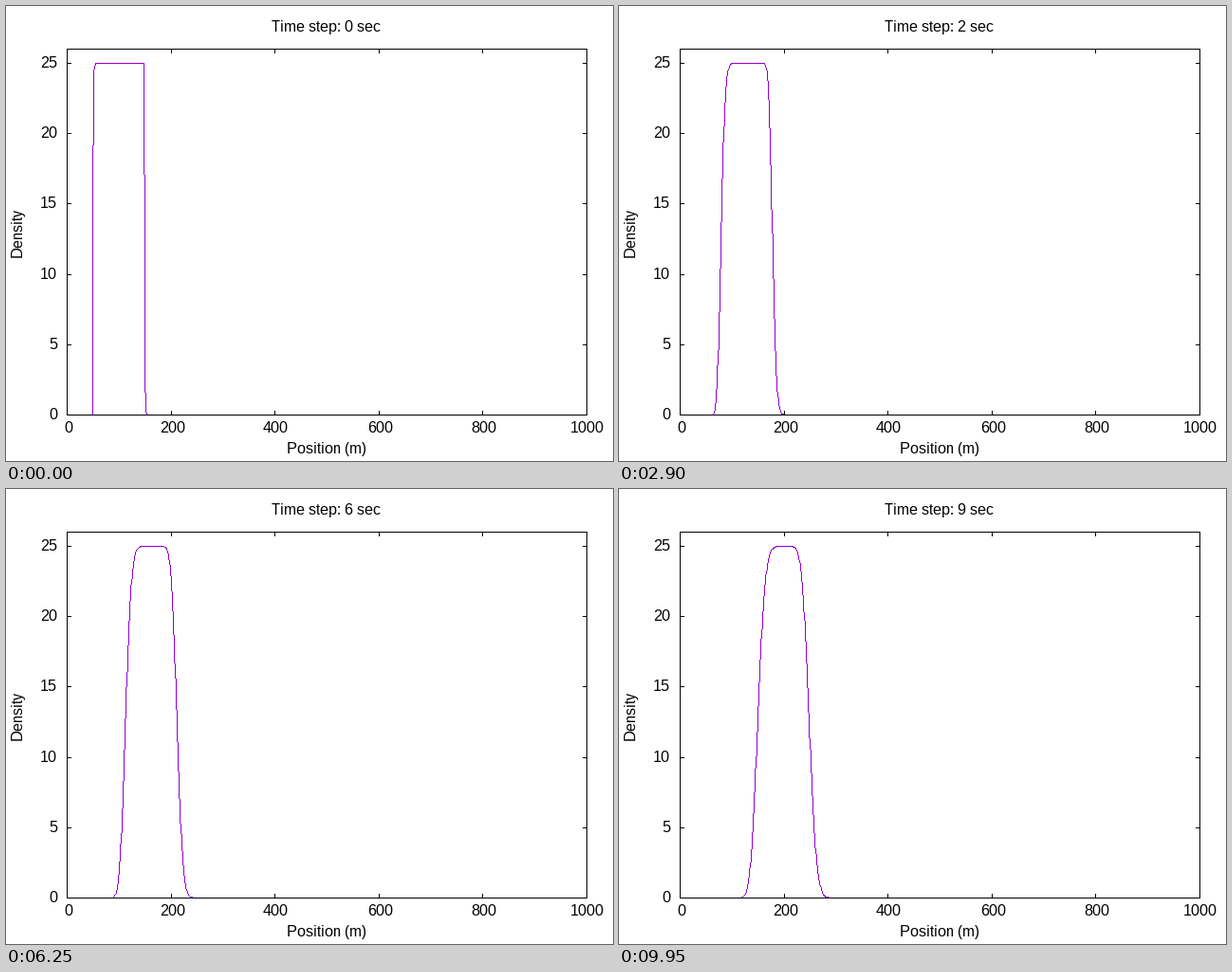
These frames come from a looping animation (640 by 480 pixels, 10 s). A matplotlib script:

```python
import numpy as np
import matplotlib.pyplot as plt
from matplotlib.animation import FuncAnimation

W, H = 640, 480
LEFT, RIGHT, TOP, BOTTOM = 64, 612, 45, 431
X_MAX, Y_MAX = 1000, 26
FRAMES, INTERVAL = 200, 50
DX, DT, SPEED, THETA = 1.0, 0.05, 10.0, 0.75
DIGIT = 9
PURPLE = (148, 0, 211, 255)

# Whole-pixel glyph advances
plt.rcParams.update({
    "font.family": "Liberation Sans",
    "font.size": 16,
    "text.hinting": "native",
    "text.hinting_factor": 1,
})

fig = plt.figure(figsize=(W / 72, H / 72), dpi=72, facecolor="white")
ax = fig.add_axes([0, 0, 1, 1])
ax.axis("off")


def nearest(v):
    return np.floor(np.asarray(v) + 0.5).astype(int)


def px(x):
    return LEFT + nearest(np.asarray(x) * (RIGHT - LEFT) / X_MAX)


def py(y):
    return BOTTOM - nearest(np.asarray(y) * (BOTTOM - TOP) / Y_MAX)


def advect():
    """Semi-implicit upwind transport of a square pulse, one profile per frame."""
    x = np.arange(0, X_MAX + DX, DX)
    u = np.where((x >= 50) & (x < 149), 25.0, 0.0)
    courant = SPEED * DT / DX
    new, old = THETA * courant, (1 - THETA) * courant
    profiles = []
    for _ in range(FRAMES):
        u[1:] -= old * np.diff(u)
        for k in range(1, len(u)):
            u[k] = (u[k] + new * u[k - 1]) / (1 + new)
        profiles.append(u.copy())
    return x, profiles


def trace(xs, ys):
    """One-pixel polyline without smoothing, on a clear canvas."""
    canvas = np.zeros((H, W, 4), np.uint8)
    for x0, y0, x1, y1 in zip(xs[:-1], ys[:-1], xs[1:], ys[1:]):
        if y0 == y1 == BOTTOM:
            continue  # hidden by the border
        n = max(abs(x1 - x0), abs(y1 - y0)) + 1
        cols = nearest(np.linspace(x0, x1, n))
        rows = nearest(np.linspace(y0, y1, n))
        canvas[rows, cols] = PURPLE
    return canvas


def stroke(x0, y0, x1, y1):
    ax.plot([x0 + 0.5, x1 + 0.5], [y0 + 0.5, y1 + 0.5], color="black",
            lw=1, solid_capstyle="projecting", snap=False, zorder=3)


def label(x, y, text, **kw):
    return ax.text(x, y, text, ha="left", va="baseline", color="black", **kw)


grid, profiles = advect()
grid_px = px(grid)
curve = ax.imshow(np.zeros((H, W, 4), np.uint8), extent=(0, W, H, 0),
                  interpolation="nearest", aspect="auto", zorder=1)

# Border, ticks and labels
for y in (TOP, BOTTOM):
    stroke(LEFT, y, RIGHT, y)
for x in (LEFT, RIGHT):
    stroke(x, TOP, x, BOTTOM)
for v in range(0, 1001, 200):
    x, text = int(px(v)), str(v)
    stroke(x, BOTTOM, x, BOTTOM - 4)
    stroke(x, TOP, x, TOP + 4)
    label(x + 1 - DIGIT * len(text) // 2, 450, text)
for v in range(0, 26, 5):
    y, text = int(py(v)), str(v)
    stroke(LEFT, y, LEFT + 4, y)
    stroke(RIGHT, y, RIGHT - 4, y)
    label(54 - DIGIT * len(text), y + 5, text)

label(296, 472, "Position (m)")
label(17, 265, "Density", rotation=90, rotation_mode="anchor")
title = label(280, 27, "")

ax.set_xlim(0, W)
ax.set_ylim(H, 0)


def update(i):
    curve.set_data(trace(grid_px, py(profiles[i])))
    title.set_text(f"Time step: {i // 20} sec")
    return curve, title


anim = FuncAnimation(fig, update, frames=FRAMES, interval=INTERVAL,
                     repeat=True, repeat_delay=0, blit=False)
plt.show()
```
